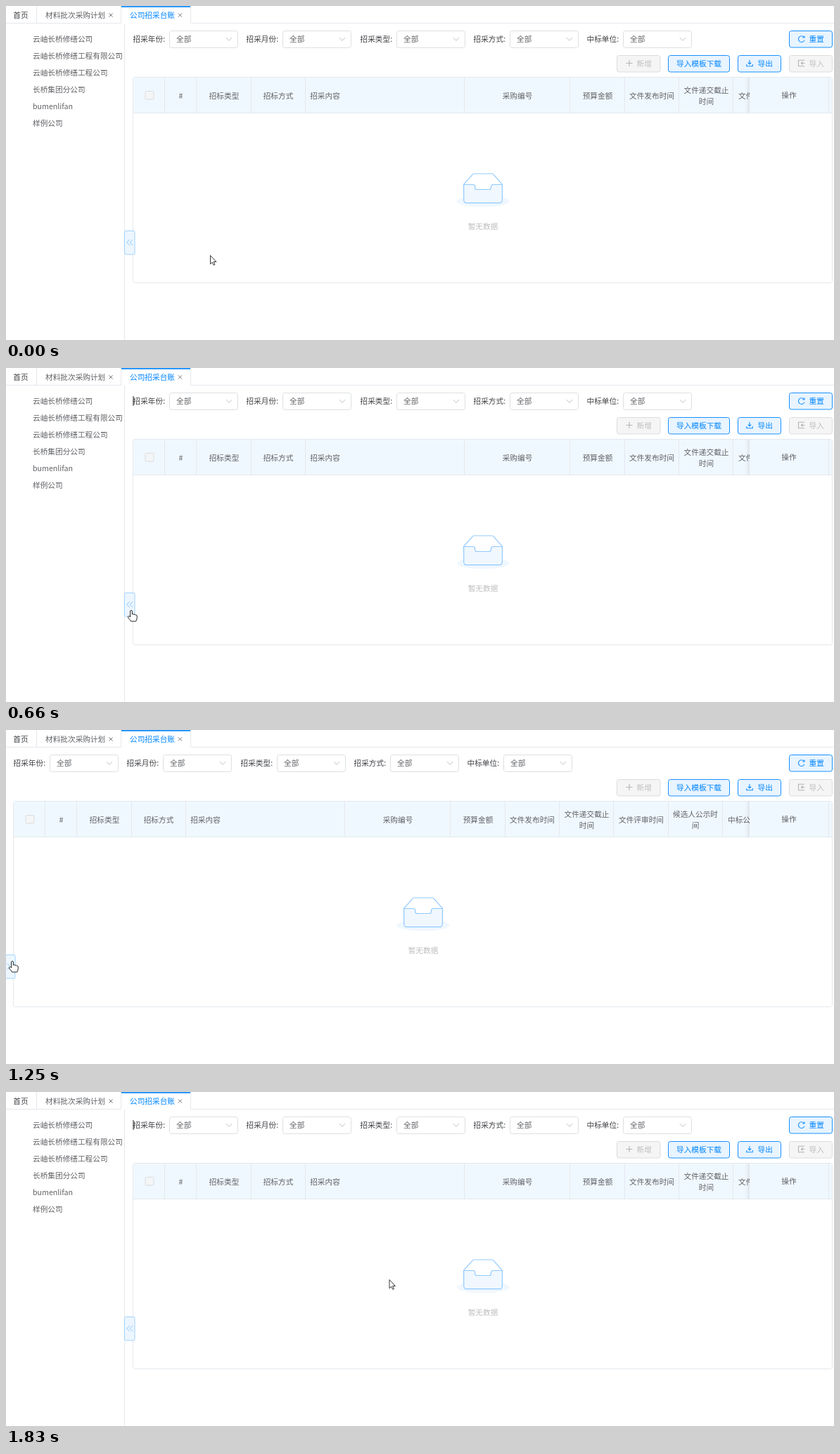
Write an HTML page that moves like this. It is 1177 px wide and 476 px high and loops after 1910 ms.

```html
<!DOCTYPE html>
<html lang="zh-CN">
<head>
<meta charset="utf-8">
<style>
html, body { margin: 0; width: 100%; height: 100%; overflow: hidden; background: #fff; }
svg { display: block; width: 100vw; height: 100vh; }
text { font: 10.66px "Noto Sans CJK SC", "Noto Sans CJK", sans-serif; white-space: pre; }
.strong { stroke: #1890ff; stroke-width: .12; }
</style>
</head>
<body>
<svg id="stage" viewBox="0 0 1177 476" fill="none"></svg>
<script>
const BLUE = '#1890ff', TEXT = '#606266', DARK = '#404246', LINE = '#e4e8ec', HEAD = '#f0f8ff';
const LOOP = 1910, TRAVEL = 170, SLIDE = 98.5, CLOSE_AT = 674.6, OPEN_AT = 1500;

const text = (x, y, s, fill = TEXT, anchor = 'start', cls = '') =>
  `<text x="${x}" y="${y + 4}" fill="${fill}" text-anchor="${anchor}" class="${cls}">${s}</text>`;
const mid = (x, y, s, fill, cls) => text(x, y, s, fill, 'middle', cls);
const path = (d, stroke, width = 1, extra = '') =>
  `<path d="${d}" stroke="${stroke}" stroke-width="${width}" ${extra}/>`;
const box = (x, y, w, h, fill, stroke, r = 0, extra = '') =>
  `<rect x="${x}" y="${y}" width="${w}" height="${h}" rx="${r}" fill="${fill}" stroke="${stroke}" ${extra}/>`;
const cross = (x, y) => path(`M${x - 2.6} ${y - 2.6}l5.2 5.2m0 -5.2l-5.2 5.2`, '#77797d');

function tabs() {
  return path('M0 24.5H163.5V0M262.5 0V24.5H1177M43.5 0V24', LINE) +
    box(164, 0, 98, 1.8, BLUE, 'none') +
    mid(21, 13, '首页', DARK) +
    text(56, 13, '材料批次采购计划') + cross(149, 13) +
    text(176, 13, '公司招采台账', BLUE, 'start', 'strong') + cross(247.5, 13);
}

function sidebar() {
  const names = ['云岫长桥修缮公司', '云岫长桥修缮工程有限公司', '云岫长桥修缮工程公司',
    '长桥集团分公司', 'bumenlifan', '样例公司'];
  return names.map((n, i) => text(38, 46.5 + 24 * i, n)).join('');
}

function filters() {
  return ['招采年份', '招采月份', '招采类型', '招采方式', '中标单位'].map((n, i) => {
    const x = Math.round(161.3 * i);
    return text(180.5 + x, 47, n + ':', DARK) +
      box(232.5 + x, 35.5, 97, 24, '#fff', '#dcdfe3', 3) +
      text(242 + x, 47, '全部') +
      path(`M${313 + x} 45.2l4 4.2l4 -4.2`, '#bcc0c6');
  }).join('');
}

function button(x, y, w, label, icon, on) {
  const color = on ? BLUE : '#bfbfbf', cls = on ? 'strong' : '';
  return box(x, y, w, 23.5, on ? '#e8f4ff' : '#f5f5f5', on ? BLUE : '#dcdcdc', 3) +
    (icon ? path(icon, on ? BLUE : '#b4b4b4', 1.1) + text(x + 28, y + 11.5, label, color, 'start', cls)
          : mid(x + w / 2, y + 11.5, label, color, cls));
}

function buttons() {
  return button(1113.5, 35.5, 61, '重置', 'M1134.2 44.2A4.4 4.4 0 1 0 1135 48.6M1135 42.4V45H1132.3', true) +
    button(868.5, 70.5, 61.5, '新增', 'M881.5 81.5h9m-4.5 -4.5v9', false) +
    button(941.5, 70.5, 87, '导入模板下载', '', true) +
    button(1040.5, 70.5, 61, '导出', 'M1057 77v6m-2.3 -2.3l2.3 2.3l2.3 -2.3M1052.8 83v2.8h8.5V83', true) +
    button(1113.5, 70.5, 61, '导入', 'M1135 77.3h-8.5v8.4h8.5M1135.5 81.5h-5m2 -2l-2 2l2 2', false);
}

function columns() {
  const edges = [225.5, 270.5, 348.5, 425.5, 651.5, 801.5, 879.5, 956.5, 1033.5, 1111.5, 1188.5];
  const cells = [[248.5, '#'], [310, '招标类型'], [387, '招标方式'], [453.5, '招采内容'], [727, '采购编号'],
    [841, '预算金额'], [918, '文件发布时间'], [995.5, '文件递交截止', '时间'], [1073, '文件评审时间'],
    [1150, '候选人公示时', '间'], [1228, '中标公示时间']];
  return path(edges.map(x => `M${x} 102V152`).join(''), LINE) +
    box(198, 121.5, 12, 11.5, '#f4f5f6', '#d9dcdf', 1.5) +
    cells.map(([x, a, b]) => b ? mid(x, 119.5, a) + mid(x, 135.5, b) : mid(x, 127.7, a)).join('');
}

function fixedColumn() {
  return box(1050, 102, 7, 50, 'url(#shade)', 'none') +
    box(1057, 102, 117, 50, HEAD, 'none') +
    path('M1169.5 102V152', LINE) +
    mid(1113, 127, '操作');
}

function emptyState() {
  const edge = '#91caff';
  return '<g transform="translate(640 239) scale(1.19)">' +
    '<ellipse cx="32" cy="33" rx="31.5" ry="6.8" fill="#f0f7fe"/>' +
    path('M9 12.8L19.1 1.3Q20 0 21.1 0H42.9Q44 0 44.9 1.3L55 12.8V22H9Z', edge, 1, 'fill="#fff"') +
    path('M41.6 15.9C41.6 14.3 42.6 13 43.8 13H55V31.1C55 33.3 53.7 35 52 35H12C10.3 35 9 33.3 9 31.1V13H20.2' +
      'C21.4 13 22.4 14.3 22.4 15.9S23.4 18.9 24.6 18.9H39.4C40.6 18.9 41.6 17.5 41.6 15.9Z', edge, 1, 'fill="#f0f7fe"') +
    '</g>' + mid(678, 313.5, '暂无数据', '#bdbdbd');
}

const chevrons = (id, dir) =>
  path([-0.2, 4.2].map(d => `M${176 + dir * (d - 4)} 332.8l${dir * 4} 4.2l${-dir * 4} 4.2`).join(''),
    '#8cc8ff', 1, `id="${id}"`);

const stage = document.getElementById('stage');
stage.innerHTML = `
  <defs>
    <clipPath id="sideClip"><rect id="sideRect" y="25" height="451"/></clipPath>
    <clipPath id="headClip"><rect y="100" width="1057" height="54"/></clipPath>
    <linearGradient id="shade">
      <stop stop-color="#000" stop-opacity="0"/>
      <stop offset=".5" stop-color="#000" stop-opacity=".025"/>
      <stop offset="1" stop-color="#000" stop-opacity=".08"/>
    </linearGradient>
  </defs>
  ${tabs()}
  <g clip-path="url(#sideClip)">${sidebar()}</g>
  <rect id="frame" y="101.5" height="293" rx="3" stroke="${LINE}"/>
  <rect id="head" y="102" height="50" fill="${HEAD}"/>
  <g clip-path="url(#headClip)"><g class="slide">${columns()}</g></g>
  ${fixedColumn()}
  <path id="headLines" stroke="${LINE}"/>
  <g class="slide">${filters()}</g>
  ${buttons()}
  <g id="empty">${emptyState()}</g>
  <g class="slide">
    <path d="M168.5 25V476" stroke="${LINE}"/>
    ${box(168.5, 320.5, 14.5, 33.5, '#edf6ff', '#9fd2ff', 2)}
    ${chevrons('left', -1)}${chevrons('right', 1)}
    <path id="caret" d="M181 40V54" stroke="#222"/>
  </g>
  <g id="pointer">
    <path id="arrow" d="M.5 .5V12.8L3.3 10.2L5.1 14.3L6.9 13.5L5.2 9.5H8.9Z" fill="#fff" stroke="#222" stroke-width=".9"/>
    <path id="hand" d="M-1.4 1.2Q0 -.6 1.4 1.2V6Q2.8 5 4 6.4Q5.4 5.6 6.4 7Q8.2 6.6 8.2 8.4V11.5Q8 14 6.6 16H-.4Q-2 13.4 -4.2 11Q-5.4 9 -3.6 8.6Q-2.4 8.6 -1.4 10Z" fill="#fff" stroke="#222" stroke-width="1"/>
  </g>`;

const el = id => document.getElementById(id);
const show = (id, on) => el(id).setAttribute('visibility', on ? 'visible' : 'hidden');
const shift = (node, x, y = 0) => node.setAttribute('transform', `translate(${x} ${y})`);
const sliders = stage.querySelectorAll('.slide');

// The screen refreshes only at these times.
const ticks = [0, 80, 160, 250, 330, 410, 500, 580, 660, 760, 850, 930, 1010, 1090, 1170, 1250, 1420, 1500, 1580, 1660, 1750, 1830];
const route = [[0, 290, 355], [160, 268, 368], [330, 212, 359], [500, 180, 345], [580, 177, 341], [660, 178, 345],
  [760, 80.5, 337], [850, 52, 331], [1010, 26.5, 327], [1170, 18, 328], [1250, 9, 329], [1500, 8.5, 328],
  [1580, 8.5, 328], [1660, 110, 314], [1750, 360, 286], [1830, 544.5, 267]];

function pointerAt(t) {
  const i = route.findIndex(p => p[0] >= t);
  if (i < 1) return route[0].slice(1);
  const [t0, x0, y0] = route[i - 1], [t1, x1, y1] = route[i], k = (t - t0) / (t1 - t0);
  return [x0 + (x1 - x0) * k, y0 + (y1 - y0) * k];
}

function easeOut(t) {
  const k = Math.min(1, Math.max(0, t / SLIDE));
  return 1 - (1 - k) ** 2;
}

function render(time) {
  const t = ticks.filter(v => v <= time).pop();
  const s = Math.round(TRAVEL * (easeOut(t - CLOSE_AT) - easeOut(t - OPEN_AT)));
  const open = t < CLOSE_AT || t >= OPEN_AT;
  const left = 180.5 - s;

  sliders.forEach(g => shift(g, -s));
  shift(el('empty'), -s / 2);
  el('sideRect').setAttribute('width', Math.max(0, 168.5 - s));
  el('frame').setAttribute('x', left);
  el('frame').setAttribute('width', 1174.5 - left);
  el('head').setAttribute('x', left + .5);
  el('head').setAttribute('width', 1173.5 - left);
  el('headLines').setAttribute('d', `M${left + 2} 101.5H1173M${left} 152.5H1174.5`);
  show('left', open);
  show('right', !open);
  show('caret', (t >= 500 && t < 1000) || t > 1500);

  const hand = (t >= 500 && t < 700) || (t >= 1250 && t < 1500);
  show('hand', hand);
  show('arrow', !hand);
  shift(el('pointer'), ...pointerAt(t));
}

const start = performance.now();
function loop() {
  render((performance.now() - start) % LOOP);
  requestAnimationFrame(loop);
}
loop();
</script>
</body>
</html>
```
